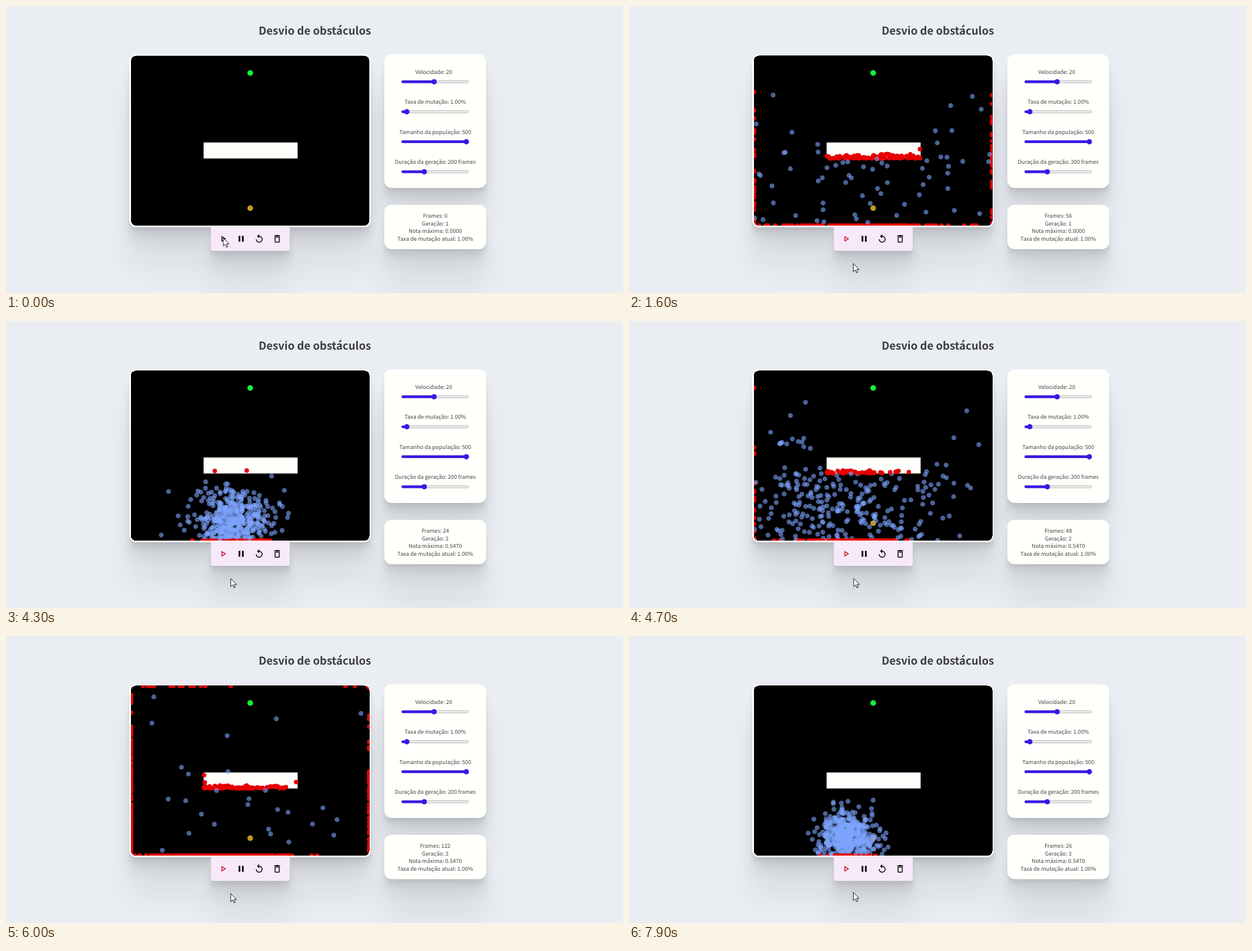
Write an HTML page with a canvas that moves like this. It is 1096 by 511 pixels and loops after 8 s.

```html
<!DOCTYPE html>
<html lang="pt">
<head>
<meta charset="utf-8">
<title>Desvio de obstáculos</title>
<style>
  html, body { margin: 0; width: 100%; height: 100%; overflow: hidden; background: #eaeef3; }
  div, canvas, svg { position: absolute; left: 0; top: 0; }
  .card {
    background: #fffffc;
    border-radius: 13px;
    box-shadow:
      0 1.9px 1.5px rgba(0, 0, 0, .02),
      0 4.6px 3.6px rgba(0, 0, 0, .028),
      0 8.5px 6.8px rgba(0, 0, 0, .035),
      0 15.2px 12.2px rgba(0, 0, 0, .042),
      0 28.4px 22.7px rgba(0, 0, 0, .05),
      0 68px 54.4px rgba(0, 0, 0, .07);
  }
  #frame { left: 219.4px; top: 85.8px; width: 428.7px; height: 308px; border-radius: 12px; }
  #bar { left: 364px; top: 393px; width: 139.5px; height: 42.5px; border-radius: 0 0 4px 4px; background: #f8e9fa; }
  #settings { left: 672px; top: 86px; width: 181.3px; height: 237.5px; }
  #stats { left: 672px; top: 354px; width: 181.3px; height: 79px; }
  text {
    font: 9.71px "Noto Sans CJK JP", "Noto Sans CJK SC", "Noto Sans CJK", "Open Sans", sans-serif;
    text-anchor: middle;
    text-rendering: geometricPrecision;
    fill: #444;
  }
  #title { font-size: 19.4px; font-weight: 700; fill: #3d3d3d; }
</style>
</head>
<body>
<div class="card" id="frame"></div>
<div class="card" id="bar"></div>
<div class="card" id="settings"></div>
<div class="card" id="stats"></div>
<canvas id="world" width="1096" height="511"></canvas>
<svg width="1096" height="511">
  <text id="title" x="548.5" y="50.6">Desvio de obstáculos</text>
  <g id="sliders"></g>
  <text id="frames" x="762.5" y="377.2"></text>
  <text id="generation" x="762.5" y="390.8"></text>
  <text id="score" x="762.5" y="404.4"></text>
  <text x="762.5" y="418">Taxa de mutação atual: 1.00%</text>
  <g transform="translate(376.7 405.5) scale(.75)">
    <path id="play" d="M10 8.64L15.27 12 10 15.36V8.64M8 5v14l11-7L8 5z"/>
    <path transform="translate(42.67)" d="M6 19h4V5H6v14zm8-14v14h4V5h-4z"/>
    <path transform="translate(85.33)" d="M12 5V1L7 6l5 5V7c3.31 0 6 2.69 6 6s-2.69 6-6 6-6-2.69-6-6H4c0 4.42 3.58 8 8 8s8-3.58 8-8-3.58-8-8-8z"/>
    <path transform="translate(128)" d="M6 19c0 1.1.9 2 2 2h8c1.1 0 2-.9 2-2V7H6v12zM8 9h8v10H8V9zm7.5-5l-1-1h-5l-1 1H5v2h14V4h-3.5z"/>
  </g>
  <path id="cursor" d="M0 0V14.5L3.4 11.4 5.8 16.6 8 15.6 5.7 10.6H10.3Z" fill="#fff" stroke="#111"/>
</svg>
<script>
const $ = id => document.getElementById(id);
const ctx = $('world').getContext('2d');
const LOOP = 8000, STEP = 100, LIFE = 200, PLAY_AT = 600;
const start = { x: 433.8, y: 360 };
const box = { l: 222.2, t: 88.7, r: 645.2, b: 390.9 };
const wall = { l: 351, t: 243, r: 518, b: 271.5 };

$('sliders').innerHTML = [
  ['Velocidade: 20', 760.5, 759.8],
  ['Taxa de mutação: 1.00%', 712, 762.5],
  ['Tamanho da população: 500', 817.7, 762.5],
  ['Duração da geração: 200 frames', 743, 762.5]
].map(([label, thumb, center], i) => {
  const y = 134.9 + 53.4 * i;
  return `
  <text x="${center}" y="${y - 14}">${label}</text>
  <rect x="703" y="${y - 2}" width="118.5" height="4" rx="2" fill="#efefef" stroke="#b2b2b2"/>
  <rect x="702.5" y="${y - 2.4}" width="${thumb - 702.5}" height="4.8" rx="2.4" fill="#3719e5"/>
  <circle cx="${thumb}" cy="${y}" r="4.7" fill="#3719e5"/>`;
}).join('');

let seed = 20;
function random() {
  seed = seed + 0x6D2B79F5 | 0;
  let h = Math.imul(seed ^ seed >>> 15, 1 | seed);
  h = h + Math.imul(h ^ h >>> 7, 61 | h) ^ h;
  return ((h ^ h >>> 14) >>> 0) / 4294967296;
}
const noise = () => (random() + random() + random() - 1.5) * 2;
const clamp = (v, lo, hi) => Math.min(hi, Math.max(lo, v));
const inside = (x, y, r) => x > r.l && x < r.r && y > r.t && y < r.b;

// Random acceleration at each step, until the dot hits an edge or the wall.
function walk({ force, drift }) {
  let { x, y } = start, vx = 0, vy = 0;
  const path = [[x, y]];
  while (path.length <= LIFE) {
    vx += force * noise();
    vy += force * noise();
    x += vx + drift;
    y += vy;
    path.push([clamp(x, box.l, box.r), clamp(y, box.t, box.b)]);
    if (!inside(x, y, box) || inside(x, y, wall)) return { path, death: path.length - 1 };
  }
  return { path, death: Infinity };
}

// Repeats the walk until it ends within the wanted span of steps.
function makeDot(motion, from, to) {
  let dot;
  for (let i = 0; i < 1000; i++) {
    dot = walk(motion);
    if (dot.death > from && dot.death <= to) break;
  }
  return dot;
}

// Each group is [number of dots, last step all live, last step any lives].
const generations = [
  { force: .66, drift: 0, groups: [[435, 0, 56], [62, 56, 124], [3, 124, Infinity]] },
  { force: .48, drift: -1.2, groups: [[370, 0, 72], [103, 72, 122], [27, 122, Infinity]] },
  { force: .32, drift: -1.75, groups: [[500, 0, Infinity]] }
].map(motion => motion.groups.flatMap(([count, from, to]) =>
  Array.from({ length: count }, () => makeDot(motion, from, to))));
const firstFrame = [0, 185, 385];

function ramp(keys, t) {
  const i = keys.findIndex(k => k[0] > t);
  if (i < 0) return keys[keys.length - 1][1];
  if (!i) return keys[0][1];
  const [t0, a] = keys[i - 1], [t1, b] = keys[i];
  return a + (b - a) * (t - t0) / (t1 - t0);
}
const clock = [[612, 0], [1600, 56], [2800, 124], [3900, 185], [5500, 281], [5600, 281], [6000, 307], [7900, 411]];
const cursorX = [[0, 386], [100, 382], [600, 382], [1200, 398.5], [1600, 398.5], [1900, 399.2], [6800, 399.2], [7700, 398.5]];
const cursorY = [[0, 413], [100, 412], [600, 412], [1200, 458.5], [6800, 458.5], [7700, 456.5]];

function disc(x, y, r, color) {
  ctx.fillStyle = color;
  ctx.beginPath();
  ctx.arc(x, y, r, 0, 7);
  ctx.fill();
}

ctx.beginPath();
ctx.roundRect(box.l, box.t, box.r - box.l, box.b - box.t, 9);
ctx.clip();

function draw(t) {
  const playing = t >= PLAY_AT;
  const total = Math.round(ramp(clock, t));
  const gen = firstFrame.findLastIndex(f => total >= f);
  const n = total - firstFrame[gen];

  ctx.fillStyle = '#000';
  ctx.fillRect(0, 0, 1096, 511);
  ctx.fillStyle = '#fffffc';
  ctx.fillRect(wall.l, wall.t, wall.r - wall.l, wall.b - wall.t);
  disc(start.x, 119.2, 5, '#14f53a');
  disc(start.x, start.y, 5, '#c39a20');
  if (playing) for (const { path, death } of generations[gen]) {
    const dead = n >= death;
    disc(...path[Math.min(n, death)], dead ? 4 : 4.3, dead ? '#e60000' : 'rgba(125,165,255,.6)');
  }

  $('frames').textContent = 'Frames: ' + n;
  $('generation').textContent = 'Geração: ' + (gen + 1);
  $('score').textContent = 'Nota máxima: ' + (gen ? '0.5470' : '0.0000');
  $('play').setAttribute('fill', playing ? '#c8102e' : '#000');
  $('cursor').setAttribute('transform', `translate(${ramp(cursorX, t)} ${ramp(cursorY, t)})`);
}

const began = performance.now();
function tick() {
  const t = (performance.now() - began) % LOOP;
  draw(Math.floor(t / STEP) * STEP);
  requestAnimationFrame(tick);
}
tick();
</script>
</body>
</html>
```
